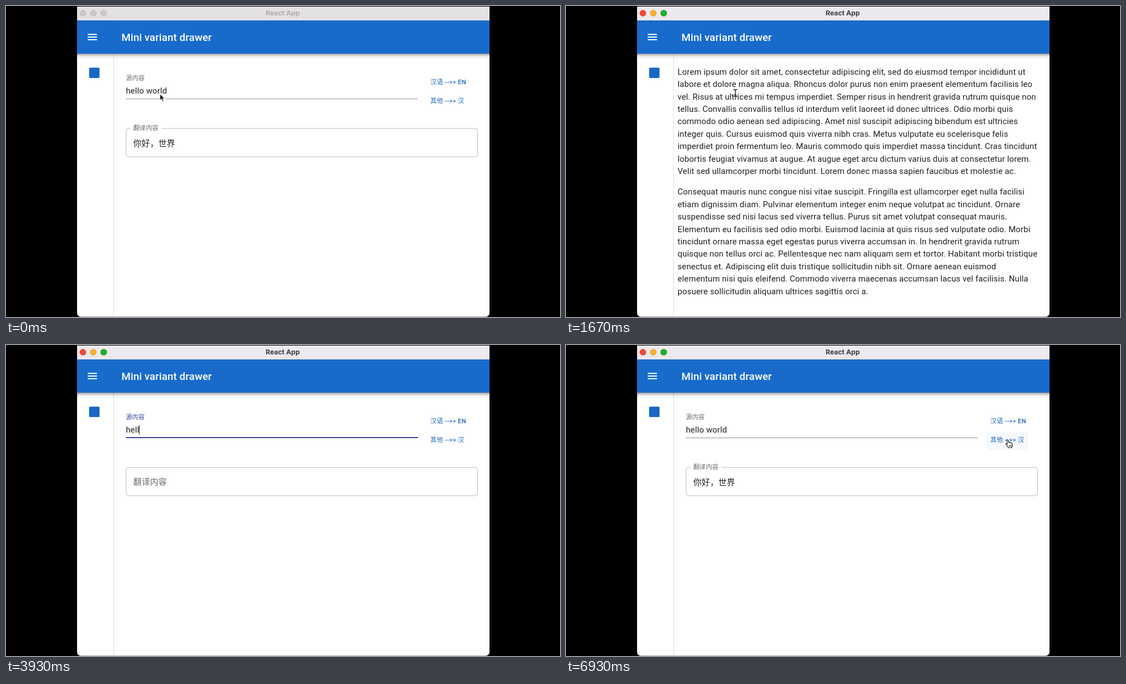
Recreate the animation shown at these times as an HTML page. Size 998 px wide and 561 px high, loop 8400 ms.

```html
<!DOCTYPE html>
<html lang="zh-CN">
<head>
<meta charset="utf-8">
<title>Mini variant drawer</title>
<style>
html, body { margin: 0; width: 100%; height: 100%; overflow: hidden; background: #000; }
#stage { display: block; width: 100%; height: 100%; }
#stage * {
  animation-duration: 8.4s;
  animation-iteration-count: infinite;
  animation-timing-function: cubic-bezier(.4, 0, .2, 1);
}
#stage .step { animation-timing-function: step-end; }

text, .article { font: 14.94px Roboto, 'Noto Sans CJK SC', 'Noto Sans CJK', sans-serif; letter-spacing: .00938em; fill: #202020; white-space: pre; }
.article { color: #202020; line-height: 22.4px; }
.article p { margin: 0 0 15px; }
.caption { font: 700 12.2px Inter, sans-serif; letter-spacing: 0; text-anchor: middle; }
.heading { font-size: 18.67px; font-weight: 500; letter-spacing: .0075em; fill: #fff; }
.action { font-size: 11.2px; font-weight: 500; letter-spacing: .02857em; fill: #1a66bd; }
.label { fill: #6b6b6b; }

/* window and pages */
#active { animation-name: active; }
@keyframes active { 0% { opacity: 0 } 1.55%, 100% { opacity: 1 } }
#form { animation-name: form; }
@keyframes form { 0% { opacity: 1 } 19.88% { opacity: 0 } 29.17%, 100% { opacity: 1 } }
#lorem { animation-name: lorem; }
@keyframes lorem { 0% { opacity: 0 } 19.88% { opacity: 1 } 29.17%, 100% { opacity: 0 } }

/* sidebar item */
#itemHover { animation-name: itemHover; }
@keyframes itemHover { 0%, 26.4% { opacity: 0 } 28.2%, 33.2% { opacity: 1 } 35%, 100% { opacity: 0 } }
#itemRipple { animation-name: itemRipple; }
@keyframes itemRipple {
  0%, 29.1% { transform: scale(0); opacity: 0 }
  29.17% { transform: scale(.2); opacity: .6 }
  30.1% { transform: scale(.45); opacity: 1 }
  32.5%, 100% { transform: scale(1); opacity: 0 }
}

/* source field */
#sourceMove { animation-name: sourceMove; }
@keyframes sourceMove {
  0%, 29.16% { transform: translate(216px, 134.3px) scale(.75) }
  29.17%, 34.88% { transform: translate(216px, 158.2px) scale(1) }
  37.26%, 100% { transform: translate(216px, 134.3px) scale(.75) }
}
#sourceLabel { animation-name: sourceColor; }
@keyframes sourceColor { 0%, 34.88% { fill: #6b6b6b } 37.26%, 74.6% { fill: #34439c } 77%, 100% { fill: #6b6b6b } }
#lineHover { animation-name: lineHover; }
@keyframes lineHover {
  0%, 1.55% { opacity: 0 } 3.9%, 19.87% { opacity: 1 } 19.88%, 33.6% { opacity: 0 }
  34.88%, 37.2% { opacity: 1 } 37.26%, 100% { opacity: 0 }
}
#lineFocus { animation-name: lineFocus; }
@keyframes lineFocus { 0%, 34.88% { transform: scaleX(0) } 37.26%, 74.6% { transform: scaleX(1) } 77%, 100% { transform: scaleX(0) } }

/* the tail hides the letters not typed yet and carries the caret */
#tail { animation-name: typing; }
@keyframes typing {
  0% { transform: translateX(80px) }
  29.17% { transform: translateX(0) }
  41.31% { transform: translateX(8.4px) }
  42.86% { transform: translateX(16.4px) }
  45.24% { transform: translateX(20.2px) }
  46.79% { transform: translateX(24px) }
  49.17% { transform: translateX(32.6px) }
  50.83% { transform: translateX(36.5px) }
  53.21% { transform: translateX(47.9px) }
  57.98% { transform: translateX(56.5px) }
  58.69% { transform: translateX(61.7px) }
  61.07% { transform: translateX(65.5px) }
  62.74%, 100% { transform: translateX(74.1px) }
}
#caret { animation-name: caret; }
@keyframes caret { 0% { opacity: 0 } 34.88% { opacity: 1 } 68.7%, 100% { opacity: 0 } }

/* result field */
#resultMove { animation-name: resultMove; }
@keyframes resultMove {
  0%, 29.16% { transform: translate(229.3px, 224.3px) scale(.75) }
  29.17%, 79.4% { transform: translate(229.3px, 251.7px) scale(1) }
  81.8%, 100% { transform: translate(229.3px, 224.3px) scale(.75) }
}
.result { animation-name: result; }
@keyframes result { 0% { opacity: 1 } 29.17% { opacity: 0 } 79.4%, 100% { opacity: 1 } }

/* action button */
#actionHover { animation-name: actionHover; }
@keyframes actionHover { 0%, 71.3% { opacity: 0 } 72.9%, 100% { opacity: 1 } }
#focusRipple { animation-name: focusRipple; }
@keyframes focusRipple {
  0%, 1.55% { transform: scale(0); opacity: .1 }
  8.1% { transform: scale(1); opacity: .3 }
  18.2%, 19.87% { transform: scale(.93); opacity: .3 }
  19.88%, 100% { transform: scale(0); opacity: 0 }
}
#pressRipple { animation-name: pressRipple; }
@keyframes pressRipple {
  0%, 74.6% { transform: scale(0); opacity: .1 }
  78% { transform: scale(.8); opacity: .26 }
  82.5%, 100% { transform: scale(1); opacity: 0 }
}

/* pointer */
#pointer { animation-name: track; }
@keyframes track {
  0%, 1.55% { transform: translate(277px, 158px) }
  7.14%, 11.9% { transform: translate(338px, 160px) }
  18.2%, 22.26% { transform: translate(305px, 157px) }
  28.6%, 32.5% { transform: translate(162px, 140px) }
  34.88%, 66.67% { transform: translate(299px, 153px) }
  72.6%, 81.9% { transform: translate(797px, 178px) }
  82.5%, 100% { transform: translate(798px, 178px) }
}
#arrow { animation-name: arrow; }
@keyframes arrow { 0% { opacity: 1 } 1.55% { opacity: 0 } 33.2% { opacity: 1 } 33.5%, 100% { opacity: 0 } }
#beam { animation-name: beam; }
@keyframes beam {
  0% { opacity: 0 } 1.55% { opacity: 1 } 26.4% { opacity: 0 } 33.5% { opacity: 1 }
  41.31% { opacity: 0 } 66.67% { opacity: 1 } 71.3%, 100% { opacity: 0 }
}
#hand { animation-name: hand; }
@keyframes hand { 0% { opacity: 0 } 26.4% { opacity: 1 } 33.2% { opacity: 0 } 71.3%, 100% { opacity: 1 } }
</style>
</head>
<body>
<svg id="stage" viewBox="0 0 998 561">
  <defs>
    <linearGradient id="shade" x2="0" y2="1">
      <stop stop-opacity=".38"/>
      <stop offset=".3" stop-opacity=".17"/>
      <stop offset=".6" stop-opacity=".06"/>
      <stop offset="1" stop-opacity="0"/>
    </linearGradient>
    <clipPath id="iconClip"><circle cx="159" cy="121" r="19"/></clipPath>
    <clipPath id="actionClip"><rect x="757" y="157" width="75" height="33.5" rx="3.7"/></clipPath>
    <path id="beamShape" d="M-3.4-6.6Q0-6.6 0-4.6V4.6Q0 6.6-3.4 6.6M3.4-6.6Q0-6.6 0-4.6M0 4.6Q0 6.6 3.4 6.6M-2 3H2"/>
  </defs>

  <rect x="128" y="-20" width="743" height="581" rx="7" fill="#aaa"/>
  <rect x="128" y="-20" width="743" height="580" rx="7" fill="#fff"/>

  <!-- title bar -->
  <g stroke-width=".6">
    <rect x="128" width="743" height="26" fill="#e4e1e4"/>
    <g fill="#cac6ca" stroke="#b6b2b6">
      <circle cx="138.5" cy="13" r="5.6"/><circle cx="157.3" cy="13" r="5.6"/><circle cx="176" cy="13" r="5.6"/>
    </g>
    <text class="caption" x="498.5" y="17" style="fill:#aeaaae">React App</text>
    <g id="active" class="step">
      <rect x="128" width="743" height="26" fill="#ece9ef"/>
      <circle cx="138.5" cy="13" r="5.6" fill="#f0483e" stroke="#d63e35"/>
      <circle cx="157.3" cy="13" r="5.6" fill="#f6b12e" stroke="#dc9b25"/>
      <circle cx="176" cy="13" r="5.6" fill="#1fae2c" stroke="#199725"/>
      <text class="caption" x="498.5" y="17" style="fill:#3d3b3f">React App</text>
    </g>
    <rect x="128" width="743" height="1"/>
  </g>

  <!-- sidebar -->
  <path d="M193.5 86V560" stroke="#dedede"/>
  <g id="itemHover">
    <rect x="128" y="94" width="65" height="53" fill="#f2f2f2"/>
    <circle cx="159" cy="121" r="19" fill="#e4e4e4"/>
  </g>
  <g clip-path="url(#iconClip)"><g transform="translate(159 133)">
    <circle id="itemRipple" r="22" fill="#000" fill-opacity=".1"/>
  </g></g>
  <rect x="149.7" y="111.2" width="18.8" height="18.8" rx="1.8" fill="#1867c5"/>

  <!-- app bar -->
  <rect x="128" y="86" width="743" height="10" fill="url(#shade)"/>
  <rect x="128" y="26" width="743" height="60" fill="#186bcb"/>
  <path d="M147.1 51.3h16.8m-16.8 4.7h16.8m-16.8 4.7h16.8" stroke="#fff" stroke-width="1.9"/>
  <text class="heading" x="208" y="62.5">Mini variant drawer</text>

  <!-- translator page -->
  <g id="form" class="step">
    <text x="216" y="158">hello world</text>
    <g id="tail" class="step">
      <rect x="216" y="142" width="90" height="22" fill="#fff"/>
      <rect id="caret" class="step" x="215.6" y="144.5" width="1" height="17"/>
    </g>
    <g id="sourceMove"><text id="sourceLabel" class="label">源内容</text></g>
    <path d="M216 167.5H742" stroke="#8e8e8e"/>
    <path id="lineHover" d="M216 167H742" stroke="#1c1c1c" stroke-width="2"/>
    <g transform="translate(479 167)"><path id="lineFocus" d="M-263 0H263" stroke="#33469f" stroke-width="2"/></g>

    <rect x="216.5" y="220.9" width="633" height="51" rx="3.7" fill="none" stroke="#bababa"/>
    <rect class="step result" x="224.6" y="219" width="55" height="4" fill="#fff"/>
    <g id="resultMove"><text class="label">翻译内容</text></g>
    <text class="step result" x="229.3" y="252.7">你好，世界</text>

    <g clip-path="url(#actionClip)">
      <rect id="actionHover" x="757" y="157" width="75" height="33.5" fill="#f5f9fd"/>
      <g transform="translate(794.5 173.5)"><circle id="focusRipple" r="32.1" fill="#1868c8"/></g>
      <g transform="translate(797 174)"><circle id="pressRipple" r="45" fill="#1868c8"/></g>
    </g>
    <text class="action" x="764.5" y="141">汉语 --&gt;&gt; EN</text>
    <text class="action" x="764.5" y="174.7">其他 --&gt;&gt; 汉</text>
  </g>

  <!-- text page -->
  <foreignObject id="lorem" class="step" x="201" y="107.7" width="669" height="440">
    <div class="article"><p>Lorem ipsum dolor sit amet, consectetur adipiscing elit, sed do eiusmod tempor incididunt ut
labore et dolore magna aliqua. Rhoncus dolor purus non enim praesent elementum facilisis leo
vel. Risus at ultrices mi tempus imperdiet. Semper risus in hendrerit gravida rutrum quisque non
tellus. Convallis convallis tellus id interdum velit laoreet id donec ultrices. Odio morbi quis
commodo odio aenean sed adipiscing. Amet nisl suscipit adipiscing bibendum est ultricies
integer quis. Cursus euismod quis viverra nibh cras. Metus vulputate eu scelerisque felis
imperdiet proin fermentum leo. Mauris commodo quis imperdiet massa tincidunt. Cras tincidunt
lobortis feugiat vivamus at augue. At augue eget arcu dictum varius duis at consectetur lorem.
Velit sed ullamcorper morbi tincidunt. Lorem donec massa sapien faucibus et molestie ac.</p><p>Consequat mauris nunc congue nisi vitae suscipit. Fringilla est ullamcorper eget nulla facilisi
etiam dignissim diam. Pulvinar elementum integer enim neque volutpat ac tincidunt. Ornare
suspendisse sed nisi lacus sed viverra tellus. Purus sit amet volutpat consequat mauris.
Elementum eu facilisis sed odio morbi. Euismod lacinia at quis risus sed vulputate odio. Morbi
tincidunt ornare massa eget egestas purus viverra accumsan in. In hendrerit gravida rutrum
quisque non tellus orci ac. Pellentesque nec nam aliquam sem et tortor. Habitant morbi tristique
senectus et. Adipiscing elit duis tristique sollicitudin nibh sit. Ornare aenean euismod
elementum nisi quis eleifend. Commodo viverra maecenas accumsan lacus vel facilisis. Nulla
posuere sollicitudin aliquam ultrices sagittis orci a.</p></div>
  </foreignObject>

  <g id="pointer">
    <path id="arrow" class="step" d="M.4.4V12.4L3 10 5 14.6 7.2 13.6 5.2 9.2H8.8Z" stroke="#fff" stroke-width="1.1"/>
    <g id="beam" class="step" fill="none">
      <use href="#beamShape" stroke="#fff" stroke-opacity=".8" stroke-width="2.6"/>
      <use href="#beamShape" stroke="#000" stroke-width="1.2"/>
    </g>
    <g id="hand" class="step" stroke="#111" stroke-width="1.1" stroke-linejoin="round">
      <path fill="#fff" d="M-4.2-5.9a1.3 1.3 0 0 1 2.5-.5L-.6-2q.2-1.3 1.4-1 1 .2 1 1.4 1.9-.9 2.2.8 1.9-.5 2 1.2.4 3-.6 5l-.3 1.9h-6q-1.2-2-3-4-2.2-2.2-1.4-3 1-.8 2.7.9z"/>
      <path d="M.6 2.5v3m1.8-3v3m1.7-3v3" stroke-width=".9"/>
    </g>
  </g>
</svg>
</body>
</html>
```
